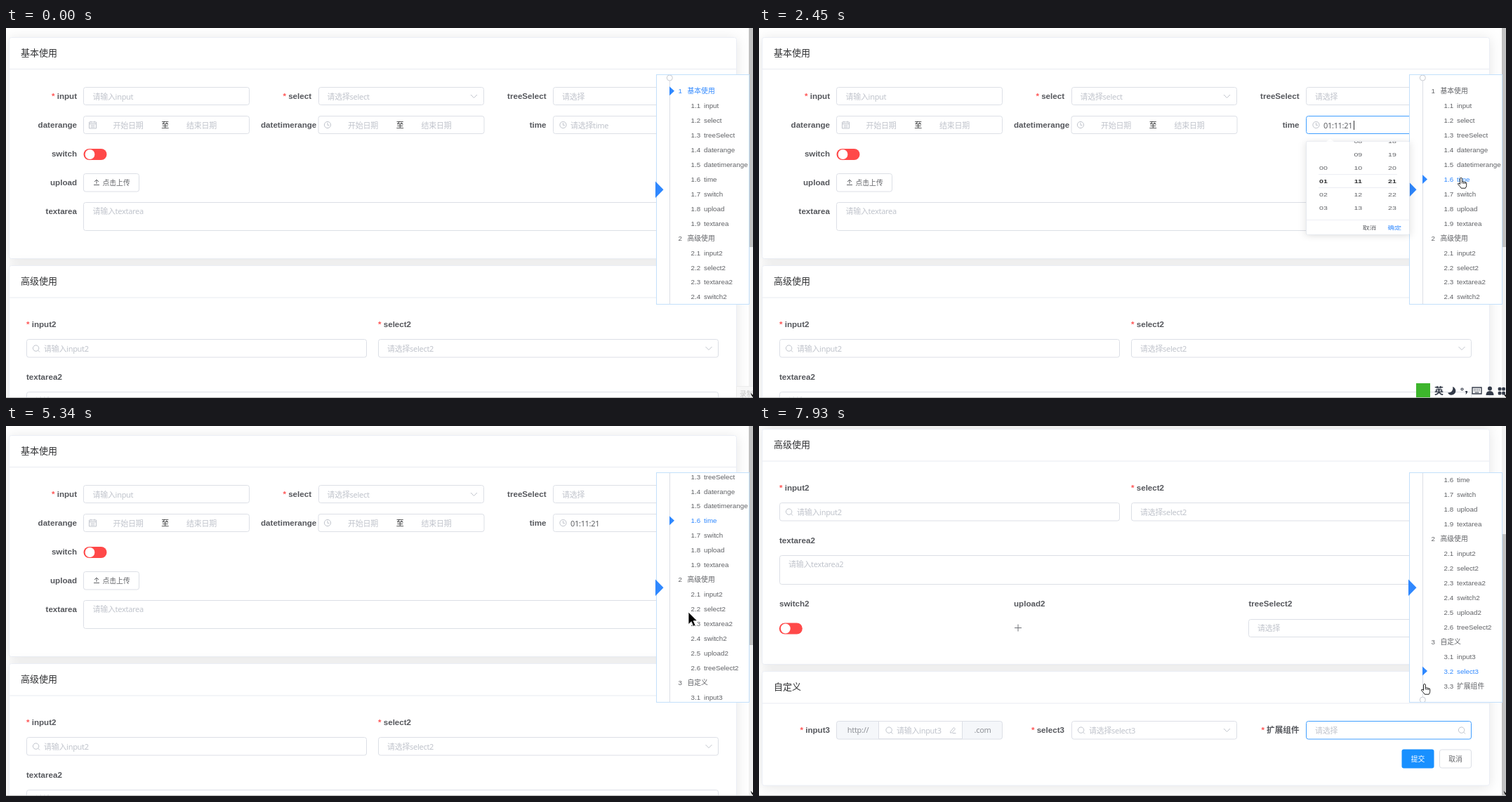
An HTML page for the animation above (8000 ms loop, 1064 by 527 pixels).

```html
<!DOCTYPE html>
<html lang="zh-CN">
<head>
<meta charset="utf-8">
<title>表单锚点导航</title>
<style>
html, body { margin: 0; width: 100%; height: 100%; overflow: hidden; background: #fff; }
svg { display: block; width: 1064px; height: 527px; }
text { white-space: pre; }
.ph, .val { font: 11px "Noto Sans", "Noto Sans CJK SC", "Noto Sans CJK", sans-serif; letter-spacing: -.3px; fill: #c0c4cc; }
.val { fill: #606266; }
.gray { fill: #909399; }
.dark { fill: #303133; }
.lab { font: bold 11.6px "Liberation Sans", Arial, "Noto Sans CJK SC", "Noto Sans CJK", sans-serif; fill: #55575c; }
.title { font: 13px "Noto Sans CJK SC", "Noto Sans CJK", sans-serif; fill: #303133; }
.nav, .btn { font: 9.8px "Liberation Sans", Arial, "Noto Sans CJK SC", "Noto Sans CJK", sans-serif; fill: #606266; }
.num { font: 10.6px "Liberation Sans", Arial, sans-serif; fill: #606266; }
.num.sel { font-weight: bold; fill: #303133; }
.ime { font: bold 13px "Noto Sans CJK SC", "Noto Sans CJK", sans-serif; fill: #333a48; }
.nav.on, .btn.blue { fill: #2f88ff; }
.btn.white { fill: #fff; }
.star { fill: #f55; }
.box { fill: #fff; stroke: #dcdfe6; }
.line { fill: none; stroke: #e8ebf1; }
.icon { fill: none; stroke: #c0c4cc; stroke-width: 1; }
.card { fill: #fff; stroke: #ebeef5; filter: drop-shadow(0 2px 9px rgba(0,0,0,.1)); }
.pop { fill: #fff; stroke: #e4e7ed; filter: drop-shadow(0 2px 6px rgba(0,0,0,.12)); }
</style>
</head>
<body>
<svg id="stage" viewBox="0 0 1064 527" xmlns="http://www.w3.org/2000/svg"></svg>
<script>
const BLUE = '#2f88ff', FOCUS = '#409eff', BORDER = '#dcdfe6';

// ---- drawing helpers; text y is the visual middle of the line
const text = (x, y, s, cls, anchor = 'start', extra = '') =>
  `<text x="${x}" y="${y + 4}" class="${cls}" text-anchor="${anchor}" ${extra}>${s}</text>`;
const box = (x, y, x2, y2, extra = '') =>
  `<rect class="box" x="${x + .5}" y="${y + .5}" width="${x2 - x - 1}" height="${y2 - y - 1}" rx="3" ${extra}/>`;
const path = (d, extra = 'class="icon"') => `<path d="${d}" ${extra}/>`;
const hline = (x, y, x2) => path(`M${x} ${y + .5}H${x2}`, 'class="line"');
const star = '<tspan class="star">* </tspan>';
const label = (x, y, s, anchor = 'end', must = false) =>
  text(x, y, (must ? star : '') + s, 'lab', anchor);
const arrow = (x, y) => path(`M${x - 4.5} ${y - 2}l4.5 4.5l4.5 -4.5`);
const clock = (x, y) => `<circle class="icon" cx="${x}" cy="${y}" r="4.6"/>` + path(`M${x} ${y - 3}v3.4h2.6`);
const search = (x, y) => `<circle class="icon" cx="${x - .4}" cy="${y - .4}" r="4.2"/>` + path(`M${x + 2.6} ${y + 2.6}l2.4 2.4`);
const calendar = (x, y) => path(`M${x - 5} ${y - 4}h10v9h-10zM${x - 5} ${y - 1.5}h10M${x - 2.5} ${y - 5.5}v2.5M${x + 2.5} ${y - 5.5}v2.5M${x - 3} ${y + .8}h6M${x - 3} ${y + 3}h6`);
const toggle = (x, y) => `<rect x="${x}" y="${y - 8}" width="33" height="16" rx="8" fill="#ff4949"/><circle cx="${x + 9}" cy="${y}" r="6.9" fill="#fff"/>`;
const card = (y, y2, name, head) =>
  `<rect class="card" x="4.5" y="${y + .5}" width="1036" height="${y2 - y - 1}" rx="3"/>` +
  hline(5, head, 1040) + text(21, (y + head) / 2 + .7, name, 'title');
const range = (x, icon) => box(x, 125, x + 237, 151) + icon(x + 13.5, 138) +
  text(x + 64, 138.5, '开始日期', 'ph', 'middle') + text(x + 116.5, 138, '至', 'ph dark', 'middle') +
  text(x + 168.5, 138.5, '结束日期', 'ph', 'middle');

// ---- page
const basic = card(13, 329, '基本使用', 58) +
  label(101, 97.3, 'input', 'end', true) + box(110, 84, 347, 110) + text(123.5, 97.5, '请输入input', 'ph') +
  label(435, 97.3, 'select', 'end', true) + box(445, 84, 681, 110) + text(457.5, 97.5, '请选择select', 'ph') + arrow(666.5, 97) +
  label(769.5, 97.3, 'treeSelect') + box(779, 84, 1015, 110) + text(792, 97.5, '请选择', 'ph') +
  label(101, 138, 'daterange') + range(110, calendar) +
  label(363, 138, 'datetimerange', 'start') + range(444.5, clock) +
  label(769.5, 138, 'time') + box(779, 125, 1015, 151, 'id="timeBox"') + clock(793.5, 138) +
  text(804, 138.5, '请选择time', 'ph', 'start', 'id="timeText"') + path('M847.5 132v13', 'id="caret" stroke="#303133"') +
  label(101, 179, 'switch') + toggle(110.5, 180) +
  label(101, 219.5, 'upload') + box(110, 207, 190, 233.5) +
  path('M125 223.5h8M129 222v-6M126 219l3 -3l3 3', 'fill="none" stroke="#606266"') + text(137.5, 219.8, '点击上传', 'btn') +
  label(101, 260.7, 'textarea') + box(110, 248, 1015, 289, 'id="area"') + text(123.5, 261, '请输入textarea', 'ph');

const advanced = card(338, 674, '高级使用', 383.5) +
  label(29, 421.5, 'input2', 'start', true) + box(29, 443, 514, 469.5) + search(43, 456.5) + text(54, 456.5, '请输入input2', 'ph') +
  label(530, 421.5, 'select2', 'start', true) + box(530, 443, 1015, 469.5) + text(543, 456.5, '请选择select2', 'ph') + arrow(1001, 456) +
  label(29, 496.7, 'textarea2', 'start') + box(29, 518, 1015, 560) + text(42, 531.2, '请输入textarea2', 'ph') +
  label(29, 587, 'switch2', 'start') + toggle(28.8, 622.5) +
  label(363, 587, 'upload2', 'start') + path('M364 621.5h10M369 616.5v10', 'stroke="#707379"') +
  label(697.5, 587, 'treeSelect2', 'start') + box(697, 609, 1015, 635) + text(710, 622.2, '请选择', 'ph');

const custom = card(683, 846.5, '自定义', 728.5) +
  label(101, 767, 'input3', 'end', true) + box(110, 754, 347, 780.5, 'style="fill:#f5f7fa"') +
  path('M170.5 754.5h119v25h-119z', `fill="#fff" stroke="${BORDER}"`) +
  text(141, 767, 'http://', 'ph gray', 'middle') + search(185.5, 767.5) + text(196, 767.5, '请输入input3', 'ph') +
  path('M272.5 769.5l5 -6l2 2l-5 5.5h-2zM275.5 771.5h5') + text(318.5, 767, '.com', 'ph gray', 'middle') +
  label(435, 767, 'select3', 'end', true) + box(445, 754, 681, 780.5) + search(459, 767.5) + text(470, 767.5, '请选择select3', 'ph') + arrow(666.5, 767) +
  label(769.5, 767, '扩展组件', 'end', true) + box(779, 754, 1015, 780.5, 'id="extBox"') + text(792, 767.5, '请选择', 'ph') + search(1001, 767.5) +
  '<rect x="915.5" y="794.5" width="46" height="27" rx="3" fill="#1890ff"/>' + text(938.5, 808.3, '提交', 'btn white', 'middle') +
  box(969, 794.5, 1015, 821.5) + text(992, 808.3, '取消', 'btn', 'middle');

// ---- outline panel
const groups = [
  ['基本使用', 'input', 'select', 'treeSelect', 'daterange', 'datetimerange', 'time', 'switch', 'upload', 'textarea'],
  ['高级使用', 'input2', 'select2', 'textarea2', 'switch2', 'upload2', 'treeSelect2'],
  ['自定义', 'input3', 'select3', '扩展组件']
];
const rowY = i => 89.8 + i * 20.93;
const items = groups.flatMap((g, n) => g.map((s, k) => [k ? `${n + 1}.${k}` : n + 1, s, k]))
  .map(([no, s, k], i) => `<g class="item">` + text(k ? 975.5 : 957.5, rowY(i) - .4, no, 'nav') +
    text(k ? 994 : 970.5, rowY(i) - .4, s, 'nav') + '</g>').join('');
const panel = `<rect x="926.5" y="66.5" width="132" height="327" fill="#fff" stroke="#c3e0fb"/>
  <g clip-path="url(#panelClip)"><g id="list">
  ${path('M945.5 75V525', `stroke="${BORDER}"`)}
  <circle cx="945.3" cy="71" r="4" fill="#fff" stroke="#c8cbd2"/><circle cx="945.3" cy="528.5" r="4" fill="#fff" stroke="#c8cbd2"/>
  ${path('M945 -6.5l7 6.5l-7 6.5z', `id="marker" fill="${BLUE}"`)}${items}</g></g>
  ${path('M925 218.5l11.5 11.7l-11.5 11.7z', `fill="${BLUE}"`)}`;

// ---- time picker
const pad = n => String(n).padStart(2, '0');
const wheel = [[804, 1], [853.3, 11], [902, 21]].map(([x, v]) =>
  [-3, -2, -1, 0, 1, 2, 3].map(d => v + d < 0 || v + d > 59 ? '' :
    text(x, 239.6 + d * 26.2, pad(v + d), d ? 'num' : 'num sel', 'middle')).join('')).join('');
const picker = `<g id="picker"><rect class="pop" x="779.5" y="161.5" width="147" height="183" rx="2"/>
  ${path('M808 162l5.5 -5l5.5 5z', 'fill="#fff"')}
  <g clip-path="url(#wheelClip)">${wheel}</g>
  ${hline(797, 226, 909)}${hline(797, 252, 909)}${hline(780, 315, 927)}
  ${text(869.5, 330.3, '取消', 'btn', 'middle')}${text(905.3, 330.3, '确定', 'btn blue', 'middle')}</g>`;

// ---- input method bar and pointers
const DARK = 'fill="#333a48"';
const ime = `<g id="ime"><rect x="936" y="506" width="20" height="20" fill="#3db52c"/>
  ${text(968.5, 517, '五', 'ime', 'middle', 'id="mode"')}
  ${path('M988 511a6 6 0 1 1 -7 8.500a6.500 6.500 0 0 0 7 -8.500z', DARK)}
  <circle cx="1001.500" cy="514.500" r="1.500" fill="none" stroke="#333a48" stroke-width="1.2"/>
  ${path('M1006 517h3q.5 3 -2.500 5q1 -2 -.5 -5z', DARK)}
  ${path('M1016 512h13v9h-13z', 'fill="none" stroke="#333a48" stroke-width="1.4"')}
  ${path('M1018 514.5h9M1018 516.7h9', 'stroke="#333a48" stroke-dasharray="1.4 1"')}${path('M1019.500 519h6', 'stroke="#333a48"')}
  <circle cx="1041" cy="513.500" r="3" ${DARK}/>${path('M1035.500 523q0 -6 5.500 -6t5.500 6z', DARK)}
  ${[[1055, 514], [1060.5, 514], [1055, 520], [1060.5, 520]].map(([x, y]) => `<rect x="${x - 2.3}" y="${y - 2.3}" width="4.700" height="4.700" rx="1.5" ${DARK}/>`).join('')}</g>`;
const hand = path('M-1.5 1.2q1.500 -1.800 2.800 0v4.600q1.600 -.9 2.200 .4q1.500 -.7 2.200 .6q1.800 -.4 2 1.400v3.200q0 1.600 -1.500 3.800h-6q-1.500 -2.600 -4.500 -5.400q-.6 -1.900 1.300 -1.600l1.500 1.400zM1.300 6v2.500M3.500 6.500v2.300M5.700 7v2',
  'id="hand" fill="#fff" stroke="#222" stroke-width="1"');
const pointer = path('M0 0V17.500L4.200 13.700L7 20.300L10 19L7.200 12.600H12.500Z', 'id="pointer" fill="#000" stroke="#fff" stroke-width=".8"');

document.getElementById('stage').innerHTML = `<defs>
  <clipPath id="panelClip"><rect x="927" y="67" width="131" height="326"/></clipPath>
  <clipPath id="wheelClip"><rect x="780" y="162" width="147" height="153"/></clipPath></defs>
  <g id="page">${basic}${advanced}${custom}</g>
  <rect x="1058" width="6" height="527" fill="#f1f1f1"/><rect id="thumb" x="1058" width="6" height="373"/>
  ${panel}${picker}
  <g id="rec"><rect x="1040.5" y="510.5" width="30" height="20" fill="#f7f7f7" stroke="#ececec"/>${text(1045, 520.500, '录制', 'btn', 'start', 'style="fill:#c4c4c4"')}</g>
  ${path('M0 526.5H1064', 'stroke="#b4b4b4"')}${path('M1060.500 519.500L1064 523V526L1062 523.500Z', 'fill="#111"')}
  ${ime}<circle id="glow" r="10" fill="#f6ee2e" fill-opacity=".85"/><g id="cursor">${hand}${pointer}</g>`;

// ---- motion
const $ = id => document.getElementById(id);
const rows = [...document.querySelectorAll('.item')];
const set = (id, name, v) => $(id).setAttribute(name, v);
const show = (id, on) => set(id, 'visibility', on ? 'visible' : 'hidden');
const within = (t, a, b) => t >= a && t < b;
const part = (t, a, b) => Math.min(1, Math.max(0, (t - a) / (b - a)));
const out = p => 1 - (1 - p) ** 4;
const smooth = p => p * p * (3 - 2 * p);

// time, x, y
const track = [
  [0, 1066, 530], [140, 1056, 450], [270, 1050, 388], [330, 1070, 386], [470, 1070, 300],
  [530, 1062, 292], [950, 1007, 180], [1150, 1007, 180], [1220, 1004, 181], [1360, 1004, 181],
  [1600, 985, 201], [1840, 999, 215], [2110, 1000, 213], [2780, 1000, 213], [3130, 912, 213],
  [3160, 912, 213], [3205, 893, 325], [3400, 893, 325], [3480, 894, 330], [3720, 894, 330],
  [4030, 905, 288], [4290, 905, 288], [4570, 950, 284], [4700, 950, 284], [4840, 972, 265],
  [5940, 972, 265], [6270, 1012, 348], [6640, 1006, 364], [7650, 1006, 364], [7780, 985, 381], [7900, 948, 367]
];
function cursorAt(t) {
  const i = track.findIndex(k => k[0] > t);
  if (i < 0) return track[track.length - 1].slice(1);
  const [a, b] = [track[i - 1], track[i]], p = part(t, a[0], b[0]);
  return [a[1] + (b[1] - a[1]) * p, a[2] + (b[2] - a[2]) * p];
}

function draw(ms) {
  const t = Math.floor((ms + 8) / 68.2) * 68.2;

  const scroll = 334 * smooth(part(t, 6930, 7220));
  set('page', 'transform', `translate(0 ${-scroll})`);
  set('thumb', 'y', -61 + scroll * 215 / 334);
  set('thumb', 'fill', within(t, 530, 670) ? '#a8a8a8' : '#c1c1c1');

  const active = t < 2170 ? 0 : t < 6950 ? 6 : 19;
  set('marker', 'transform', `translate(0 ${rowY(active)})`);
  rows.forEach((g, i) => { for (const e of g.children) e.classList.toggle('on', i === active); });
  set('list', 'transform', `translate(0 ${-138.5 * smooth(part(t, 5070, 5520))})`);

  const open = out(part(t, 2372, 2672)) * (1 - out(part(t, 3690, 3990)));
  set('picker', 'transform', `translate(0 161) scale(1 ${open}) translate(0 -161)`);
  set('picker', 'opacity', Math.min(1, open * 1.6));
  show('picker', open > .01);
  const filled = t >= 2380;
  $('timeText').textContent = filled ? '01:11:21' : '请选择time';
  set('timeText', 'class', filled ? 'val' : 'ph');
  $('timeBox').style.stroke = within(t, 2380, 3750) ? FOCUS : BORDER;
  show('caret', within(t, 2380, 2900));
  $('area').style.stroke = within(t, 4350, 4760) ? '#c0c4cc' : BORDER;
  $('extBox').style.stroke = t >= 7150 ? FOCUS : BORDER;

  show('rec', t < 130);
  show('ime', within(t, 190, 3540));
  $('mode').textContent = t < 2230 ? '五' : '英';

  const [x, y] = cursorAt(t);
  const isHand = within(t, 740, 3720) || t >= 6060;
  set('cursor', 'transform', `translate(${x} ${y})`);
  show('hand', isHand);
  show('pointer', !isHand);
  set('glow', 'cx', x - 1);
  set('glow', 'cy', y - 2);
  show('glow', within(t, 2100, 2230) || within(t, 3460, 3690) || within(t, 6940, 7080));
}

function frame() {
  draw(performance.now() % 8000);
  requestAnimationFrame(frame);
}
frame();
</script>
</body>
</html>
```
